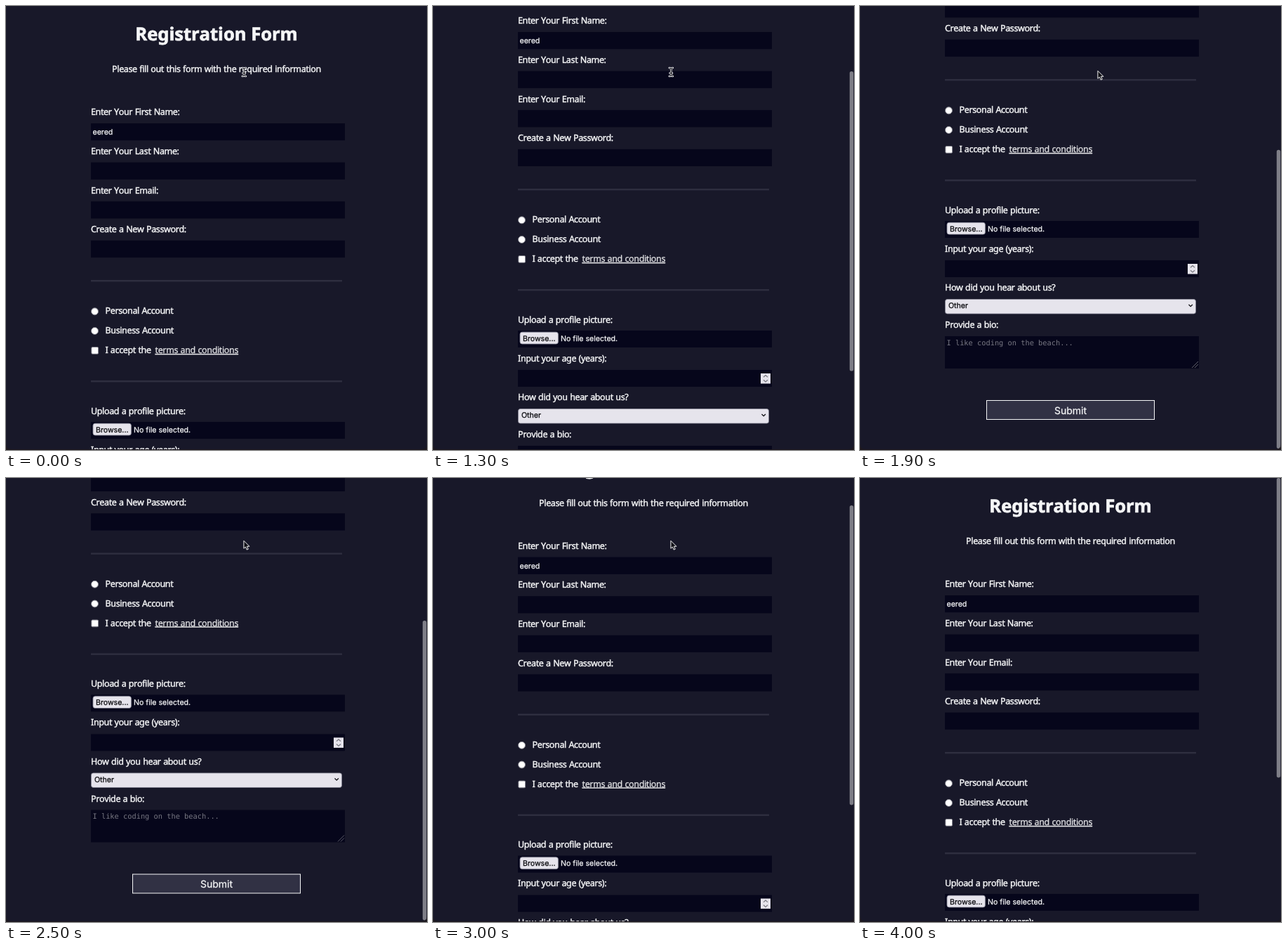
Write an HTML page that moves like this. It is 600x632 px and loops after 4100 ms.

```html
<!DOCTYPE html>
<html lang="en">
<head>
<meta charset="utf-8">
<title>Registration Form</title>
<style>
  html, body { margin: 0; width: 100%; height: 100%; overflow: hidden; background: #1d181e; }
  svg { display: block; }
  text {
    font: 12.5px "Noto Sans", "Open Sans", sans-serif;
    font-kerning: none;
    letter-spacing: -.36px;
    word-spacing: .6px;
    text-rendering: geometricPrecision;
    fill: #f5f6f7;
    stroke: #f5f6f7;
    stroke-width: .42px;
  }
  .title { font-size: 25.6px; font-weight: 700; letter-spacing: -.02px; word-spacing: 0; stroke-width: .7px; }
  .mid { text-anchor: middle; }
  .link { fill: #dfdfe2; stroke-width: .25px; text-decoration: underline; }
  .ui { font: 10.6px Inter, Roboto, sans-serif; letter-spacing: 0; word-spacing: 0; stroke-width: .25px; }
  .dark { fill: #08080c; stroke: #08080c; }
  .submit { font-size: 14px; }
  .hint {
    font: 10.33px "DejaVu Sans Mono", monospace;
    letter-spacing: 0; word-spacing: 0;
    fill: #777782; stroke: none;
  }
  .field { fill: #06061b; }
  .rule { fill: #2e2e3f; }
  .control { fill: #e6e4ec; stroke: #8f8f9d; stroke-width: .8; }
  .check { fill: #fff; stroke: #777782; }
  .line { fill: none; stroke: #08080c; stroke-width: 1.2; }
</style>
</head>
<body>
<svg width="600" height="632" viewBox="0 0 600 632">
  <defs>
    <clipPath id="window"><path d="M0 0H600V623Q600 631 592 631H8Q0 631 0 623Z"/></clipPath>
    <path id="beamShape" d="M336.8 88Q339.3 88 339.3 90.3V97.7Q339.3 100 336.8 100M341.8 88Q339.3 88 339.3 90.3M339.3 97.7Q339.3 100 341.8 100M337.5 95.5H341"/>
  </defs>
  <g clip-path="url(#window)">
    <rect width="600" height="632" fill="#181829"/>
    <g id="page">
      <text class="title mid" x="300" y="49">Registration Form</text>
      <text class="mid" x="300" y="94.2">Please fill out this form with the required information</text>
      <g id="inputs"></g>
      <text class="ui" x="123.5" y="183">eered</text>

      <rect class="rule" x="121" y="390" width="358" height="2.4"/>
      <circle class="check" cx="126.5" cy="434.8" r="5"/>
      <text x="141.5" y="438.1">Personal Account</text>
      <circle class="check" cx="126.5" cy="462.5" r="5"/>
      <text x="141.5" y="466">Business Account</text>
      <rect class="check" x="121.8" y="485.5" width="9.8" height="9.8" rx="1.5"/>
      <text x="141.5" y="494">I accept the</text>
      <text class="link" x="212.5" y="494">terms and conditions</text>
      <rect class="rule" x="121" y="533" width="358" height="2.4"/>

      <text x="121" y="580.8">Upload a profile picture:</text>
      <rect class="field" x="121" y="592" width="362" height="24"/>
      <rect class="control" x="124" y="594.2" width="54.4" height="16.8" rx="3"/>
      <text class="ui dark" x="128" y="606.5">Browse...</text>
      <text class="ui" x="182" y="606.5">No file selected.</text>

      <text x="121" y="635.8">Input your age (years):</text>
      <rect class="field" x="121" y="648" width="362" height="24"/>
      <rect x="467" y="653" width="14" height="14.5" fill="#e6e4ec"/>
      <path class="line" style="stroke:#77777f" d="M471 658.3l3-2.8 3 2.8M471 662.2l3 2.8 3-2.8"/>

      <text x="121" y="691.4">How did you hear about us?</text>
      <rect class="control" x="121.5" y="703.5" width="357" height="20.5" rx="3"/>
      <text class="ui dark" x="126" y="716">Other</text>
      <path class="line" d="M468.5 711l2.7 2.7 2.7-2.7"/>

      <text x="121" y="744.1">Provide a bio:</text>
      <rect class="field" x="121" y="756" width="362" height="46"/>
      <text class="hint" x="123.5" y="768.7">I like coding on the beach...</text>
      <path class="line" style="stroke:#777782;stroke-width:.8" d="M473 801l9-9M477 801l5-5"/>

      <rect x="180.5" y="847.5" width="239" height="27" fill="#313144" stroke="#f5f6f7"/>
      <text class="ui submit mid" x="300" y="866.5">Submit</text>
    </g>
    <rect id="thumb" x="593.8" width="5.4" rx="2.7" fill="#7e7e87"/>
    <g id="beam" fill="none">
      <use href="#beamShape" stroke="#e4e4e8" stroke-width="2.5" stroke-linecap="round"/>
      <use href="#beamShape" stroke="#101016"/>
    </g>
    <path id="arrow" d="M0 0V11L2.5 8.8L4.3 12.8L6.3 12L4.6 8H8Z" fill="#101016" stroke="#f4f4f4" stroke-linejoin="round"/>
  </g>
</svg>
<script>
  const LOOP = 4100, STEP = 100, MAX_SCROLL = 283.5;
  const el = id => document.getElementById(id);

  const labels = ['Enter Your First Name:', 'Enter Your Last Name:', 'Enter Your Email:', 'Create a New Password:'];
  el('inputs').innerHTML = labels.map((label, i) => {
    const y = 55.6 * i;
    return `<text x="121" y="${155.3 + y}">${label}</text>
      <rect class="field" x="121" y="${167 + y}" width="362" height="24.3"/>`;
  }).join('');

  // Time in ms and scroll offset in px
  const scrollPath = [
    [0, 0], [900, 0], [1000, 8], [1100, 33], [1200, 78], [1300, 130], [1400, 178],
    [1500, 216], [1600, 246], [1700, 267], [1800, 280], [1900, 286], [2000, 286.3],
    [2300, MAX_SCROLL], [2600, MAX_SCROLL], [2700, 258], [2800, 178], [2900, 98],
    [3000, 54.4], [3100, 54.4], [3200, 43], [3300, 31], [3400, 20], [3500, 11],
    [3600, 5], [3700, 1.8], [3800, 0], [LOOP, 0]
  ];

  function scrollAt(t) {
    const i = scrollPath.findIndex(([time]) => time > t);
    const [t0, s0] = scrollPath[i - 1], [t1, s1] = scrollPath[i];
    return s0 + (s1 - s0) * (t - t0) / (t1 - t0);
  }

  const show = (node, on) => node.setAttribute('visibility', on ? 'visible' : 'hidden');

  function draw(now) {
    const t = Math.floor(now % LOOP / STEP) * STEP;
    const scroll = scrollAt(t);
    el('page').setAttribute('transform', `translate(0 ${-scroll})`);

    // The thumb is squeezed while the page is pulled past its end
    const top = scroll * .716;
    el('thumb').setAttribute('y', top);
    el('thumb').setAttribute('height', Math.min(426.5, 630 - top));
    show(el('thumb'), t >= 900);

    show(el('beam'), t < 1500);
    show(el('arrow'), t >= 1500 && t < 4000);
    el('arrow').setAttribute('transform', `translate(338.9 ${t < 2500 ? 92.3 : 89.3})`);
  }

  function tick() {
    draw(performance.now());
    requestAnimationFrame(tick);
  }
  tick();
</script>
</body>
</html>
```
